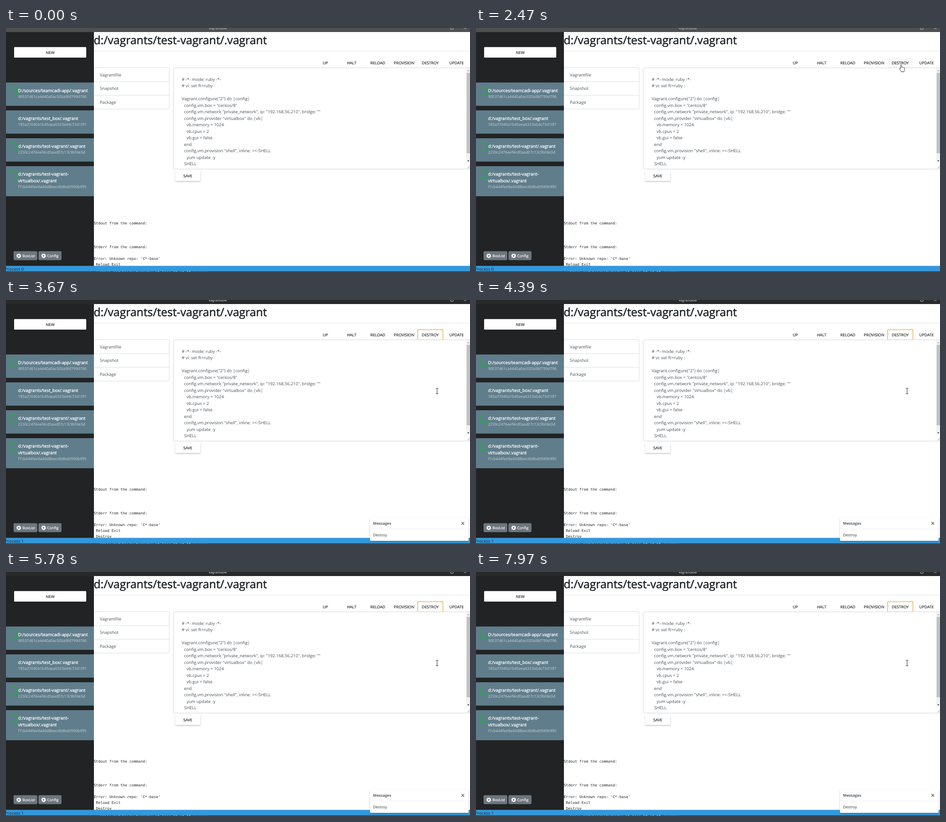
An HTML page that plays this animation: 1029 px wide and 544 px high, repeating every 7990 ms.

```html
<!DOCTYPE html>
<html lang="en">
<head>
<meta charset="utf-8">
<title>Vagrantable</title>
<style>
html, body { margin: 0; width: 100%; height: 100%; overflow: hidden; background: #fff; }
svg { display: block; width: 1029px; height: 544px; }
text { font-family: "Open Sans", "Noto Sans", sans-serif; font-size: 9.5px; fill: #495057; text-rendering: geometricPrecision; white-space: pre; }
.h1 { font-size: 25.05px; fill: #212529; stroke: #212529; stroke-width: .6; }
.btn { font-size: 8.7px; fill: #111; stroke: #111; stroke-width: .12; text-anchor: middle; }
.path { font-size: 9.75px; fill: #fff; stroke: #fff; stroke-width: .32; }
.hash { font-size: 8.48px; fill: #c9d3d8; }
.tool { font-size: 8.4px; fill: #fff; stroke: #fff; stroke-width: .2; }
.log text, .term { font-family: "DejaVu Sans Mono", monospace; font-size: 8.2px; fill: #212529; }
.spin { fill: none; stroke: #28a745; stroke-width: 2.6; stroke-dasharray: 270 90; }
.line { fill: #fff; stroke: #d9dcdf; }
.ctl { fill: none; stroke: #ccc; stroke-width: .9; }
</style>
</head>
<body>
<svg viewBox="0 0 1029 544">
  <defs>
    <clipPath id="area"><rect x="371" y="89" width="650" height="225"/></clipPath>
    <filter id="soft" x="-20%" y="-40%" width="140%" height="190%">
      <feDropShadow dx="0" dy="1.3" stdDeviation="1.4" flood-opacity=".28"/>
    </filter>
    <g id="gear">
      <circle r="4.3" fill="none" stroke="#fff" stroke-width="2" pathLength="16" stroke-dasharray="1.1 .9"/>
      <circle r="3" fill="none" stroke="#fff" stroke-width="2.4"/>
    </g>
  </defs>
  <rect width="1029" height="544" fill="#fff"/>

  <g id="log" class="log"></g>

  <text class="h1" x="194.5" y="36">d:/vagrants/test-vagrant/.vagrant</text>
  <path d="M195 51.5H1029" stroke="#e4e4e4"/>
  <rect id="hover" x="912.5" y="66" width="56.5" height="23" rx="1.5" fill="#f5f5f5"/>
  <rect id="focus" x="913" y="66.3" width="56" height="22.6" fill="none" stroke="#e5a93f" stroke-width="1.3"/>
  <g id="menu"></g>

  <rect class="line" x="194.5" y="88.5" width="167.5" height="92" rx="2.5"/>
  <path d="M195 119.5H362M195 150H362" stroke="#d9dcdf"/>
  <g id="tabs"></g>

  <rect x="371" y="88.8" width="660" height="225.7" rx="2.5" fill="#fff" stroke="#ced4da"/>
  <g id="code" clip-path="url(#area)"></g>
  <rect x="1021" y="90" width="8" height="211" fill="#f1f1f1"/>
  <rect x="1021.5" y="100" width="7.5" height="179.5" fill="#c1c1c1"/>
  <path d="M1022.8 96.3h4.8l-2.4-2.8z" fill="#a3a3a3"/>
  <path d="M1022.8 295h4.8l-2.4 2.8z" fill="#444"/>
  <path d="M1023 313l6-6M1026.5 313l2.5-2.5" stroke="#888" stroke-width=".8"/>

  <rect x="375.5" y="318.5" width="55.5" height="22.5" rx="1.5" fill="#fff" filter="url(#soft)"/>
  <text class="btn" x="403.2" y="333.2">SAVE</text>

  <rect width="195" height="531" fill="#222324"/>
  <rect x="18" y="42.5" width="160" height="23.5" rx="1.5" fill="#fff"/>
  <text class="btn" x="98" y="58">NEW</text>
  <g id="boxes"></g>
  <g id="spins"></g>

  <g fill="#6c757d" stroke="#868e96" stroke-width=".8">
    <rect x="17.3" y="498.2" width="51.6" height="18.8" rx="2"/>
    <rect x="72.6" y="498.2" width="50" height="18.8" rx="2"/>
  </g>
  <use href="#gear" x="28.3" y="508"/>
  <use href="#gear" x="83.5" y="508"/>
  <text class="tool" x="36.3" y="511.2">BoxList</text>
  <text class="tool" x="91.2" y="511.2">Config</text>

  <rect id="bar" width="1029" height="9"/>
  <text id="name" x="469.5" y="2.6" text-anchor="middle" style="font-size:7.3px">Vagrantable</text>
  <path class="ctl" d="M986 -2.5h5.6v5.4h-5.6zM1015.5 -3l5.6 5.8M1021.1 -3l-5.6 5.8"/>

  <rect y="530.3" width="1029" height="13.7" fill="#3498db"/>
  <text id="count" x="-2.5" y="541" style="fill:#1d2730"></text>
  <rect y="542.7" width="1029" height="1.3" fill="#26323a"/>
  <text class="term" x="198" y="548.4" style="fill:#cfd8dc">: image modules/node/index at line 10 at 10 <tspan fill="#3fc56b">running</tspan></text>

  <g id="toast">
    <rect x="807" y="486" width="219" height="51" rx="2" fill="#fff" filter="url(#soft)"/>
    <path d="M807 510.5H1026" stroke="#ececec"/>
    <text x="814" y="501.2" style="font-size:8.4px;font-weight:700;fill:#545b62">Messages</text>
    <path d="M1010 495l6 6M1016 495l-6 6" stroke="#555" stroke-width="1.2"/>
    <text x="814" y="527" style="font-size:8.6px;fill:#333">Destroy</text>
  </g>

  <g id="cursor">
    <path id="arrow" d="M0 0V11.6L2.7 9.1L4.5 13.2L6.5 12.3L4.7 8.4H8.2Z" fill="#fff" stroke="#222" stroke-width=".9"/>
    <path id="hand" d="M-1.2 8V1Q-1.2 -.2 0 -.2T1.2 1V5.2Q2.3 4.3 3.3 5.5Q4.5 4.8 5.4 6.1Q7.5 5.7 7.5 7.6V10.6Q7.3 12 6.3 13.2V15.2H-.2V13.6L-3.8 9.2Q-4.3 7.5 -2.8 7.4Z" fill="#fff" stroke="#222" stroke-width=".9"/>
    <path id="beam" d="M-2.8 -6H-.8L0 -5.3L.8 -6H2.8M0 -5.3V5.3M-2.8 6H-.8L0 5.3L.8 6H2.8" fill="none" stroke="#333" stroke-width="1.1"/>
  </g>
</svg>
<script>
const LOOP = 7990, CLICK = 2750, TOAST = 2900;
const $ = id => document.getElementById(id);

function add(parent, tag, attrs, label = '') {
  const el = document.createElementNS('http://www.w3.org/2000/svg', tag);
  for (const k in attrs) el.setAttribute(k, attrs[k]);
  el.textContent = label;
  $(parent).append(el);
  return el;
}

['UP', 'HALT', 'RELOAD', 'PROVISION', 'DESTROY', 'UPDATE'].forEach((s, i) =>
  add('menu', 'text', { class: 'btn', x: 708.3 + 58.15 * i, y: 81.2 }, s));

['Vagrantfile', 'Snapshot', 'Package'].forEach((s, i) =>
  add('tabs', 'text', { x: 208, y: 107.6 + 30.8 * i }, s));

`# -*- mode: ruby -*-
# vi: set ft=ruby :

Vagrant.configure("2") do |config|
  config.vm.box = "centos/8"
  config.vm.network "private_network", ip: "192.168.56.210", bridge: ""
  config.vm.provider "virtualbox" do |vb|
    vb.memory = 1024
    vb.cpus = 2
    vb.gui = false
  end
  config.vm.provision "shell", inline: <<-SHELL
    yum update -y
  SHELL
end`.split('\n').forEach((s, i) => {
  const pad = s.search(/\S|$/);
  add('code', 'text', { x: 389.7 + pad * 2.7, y: 117.9 + 14.5 * i }, s.trim());
});

[
  [121.5, 52, ['D:/sources/teamcadi-app/.vagrant'], '90537d61ca4440a0ac920a9bf799d796'],
  [183.6, 52, ['d:/vagrants/test_box/.vagrant'], '185a37040a1b45aea6323a64c73d10f1'],
  [245.8, 52, ['d:/vagrants/test-vagrant/.vagrant'], '2230c2476eef4cd0aad07c13c9bfde3d'],
  [308, 67, ['d:/vagrants/test-vagrant-', 'virtualbox/.vagrant'], 'f7cb444fee9a40d8becdb8bd3590b995']
].forEach(([y, h, names, hash]) => {
  add('boxes', 'rect', { y, width: 195, height: h, fill: '#607d8b' });
  names.forEach((s, i) => add('boxes', 'text', { class: 'path', x: 26.7, y: y + 21 + 14.5 * i }, s));
  add('boxes', 'text', { class: 'hash', x: 26.7, y: y + 19.7 + 14.4 * names.length }, hash);
});

const spins = [141.5, 265.5, 327.8].map(y => [y,
  add('spins', 'circle', { class: 'spin', cx: 17, cy: y, r: 9.2, pathLength: 360 })]);

const logLines = [
  [0, 'Stdout from the command:'], [4, 'Stderr from the command:'],
  [6, "Error: Unknown repo: 'C*-base'"], [7, ' Reload Exit'], [8, ' Destroy']
].map(([row, s]) =>
  add('log', 'text', { x: s[0] === ' ' ? 199.6 : 194.7, y: 438.3 + 13.1 * row }, s.trim()));

// time, gap direction of the spinner in degrees
const turn = [[0, 148], [1270, 720], [2470, 1260], [3670, 1800], [5100, 2430], [6550, 3015], [7990, 3563]];
// time, x, y of the pointer
const route = [
  [900, 960, 546], [1080, 905, 518], [1270, 834, 491], [1620, 829, 450], [1900, 848, 330],
  [2200, 915, 140], [2400, 943, 82.5], [3290, 943, 82.5], [3400, 946, 108],
  [3500, 952, 170], [3610, 956, 203]
];

function at(keys, t, col = 1) {
  if (t <= keys[0][0]) return keys[0][col];
  for (let i = 1; i < keys.length; i++) {
    const a = keys[i - 1], b = keys[i];
    if (t <= b[0]) return a[col] + (b[col] - a[col]) * (t - a[0]) / (b[0] - a[0]);
  }
  return keys[keys.length - 1][col];
}

const show = (el, on) => el.setAttribute('visibility', on ? 'visible' : 'hidden');

function draw(t) {
  const angle = at(turn, t) + 45;
  for (const [y, el] of spins) el.setAttribute('transform', `rotate(${angle} 17 ${y})`);

  const clicked = t >= CLICK, done = t >= TOAST;
  $('bar').setAttribute('fill', clicked ? '#292929' : '#505050');
  $('name').style.fill = clicked ? '#f0f0f0' : '#d0d0d0';
  show($('focus'), clicked);
  $('hover').setAttribute('opacity', at([[2420, 0], [2500, 1], [3320, 1], [3500, 0]], t));

  $('log').setAttribute('transform', `translate(0 ${done ? -13.1 : 0})`);
  show(logLines[4], done);
  $('count').textContent = 'Process ' + (done ? 1 : 0);
  $('toast').setAttribute('opacity', at([[TOAST, 0], [TOAST + 150, 1]], t));

  const x = at(route, t, 1), y = at(route, t, 2);
  const kind = y > 314 ? 'arrow' : y > 89 ? 'beam' : 'hand';
  $('cursor').setAttribute('transform', `translate(${x} ${y})`);
  for (const id of ['arrow', 'hand', 'beam']) show($(id), id === kind && t >= 900);
}

const start = performance.now();
function tick() {
  draw((performance.now() - start) % LOOP);
  requestAnimationFrame(tick);
}
tick();
</script>
</body>
</html>
```
